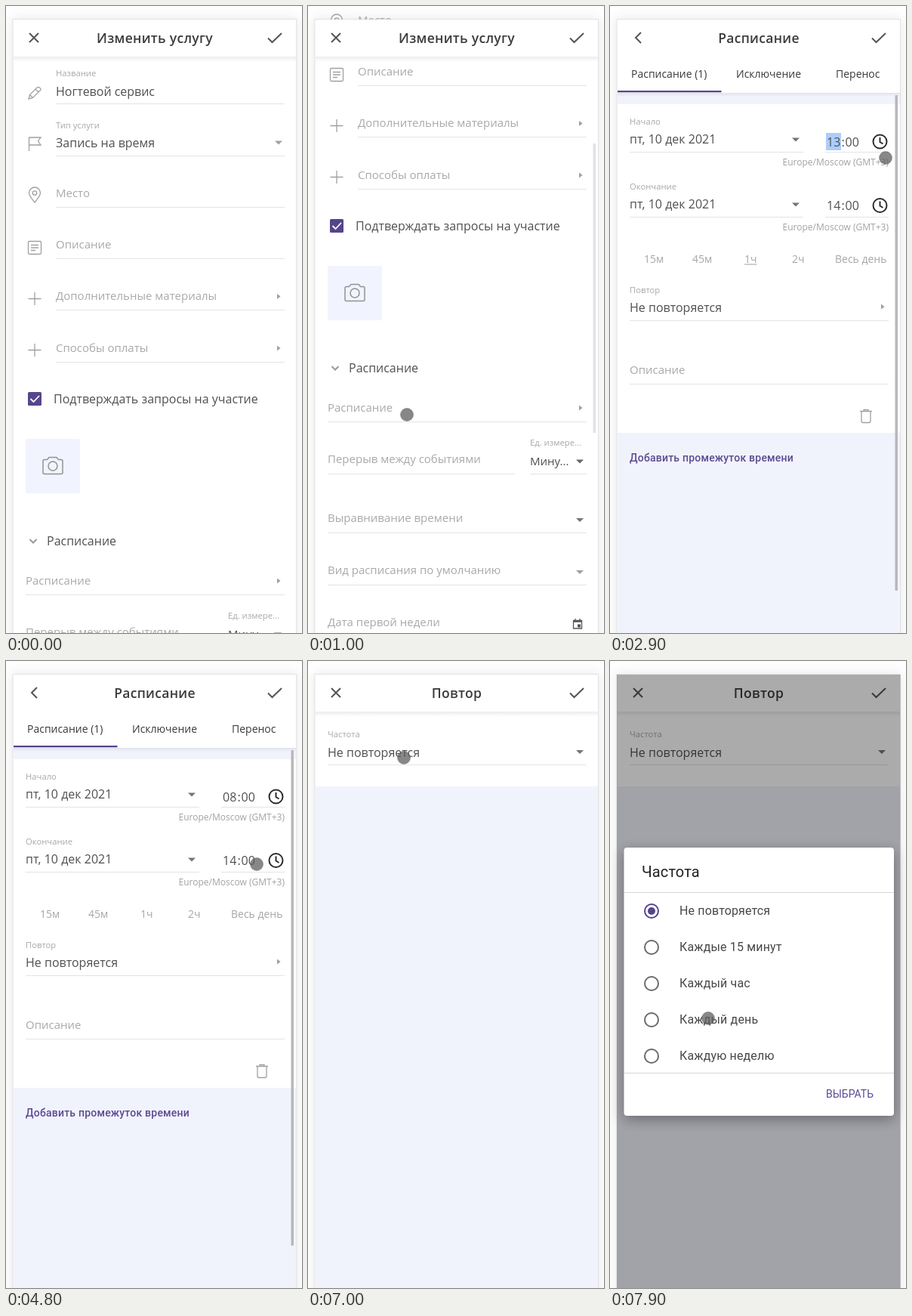
These frames come from a looping animation (392 px wide and 830 px high, 8000 ms). An HTML page:

```html
<!DOCTYPE html>
<html lang="ru">
<head>
<meta charset="utf-8">
<title>Расписание услуги</title>
<style>
  html, body { margin: 0; width: 100%; height: 100%; overflow: hidden; background: #fefefe; }
  svg { display: block; width: 392px; height: 830px; }
  text { font: 16px "Open Sans", sans-serif; fill: #505050; white-space: pre; }
  .title { font-size: 17.5px; font-weight: 600; letter-spacing: .3px; text-anchor: middle; fill: #3c3c3c; }
  .hint { font-size: 15px; fill: #a9a9a9; }
  .label { font-size: 11.25px; fill: #a8a8a8; }
  .zone { font-size: 12px; fill: #a2a2a2; text-anchor: end; }
  .tab { font-size: 14px; fill: #3a3a3a; }
  .span { font-size: 14px; fill: #a6a6a6; }
  .add { font: 500 14px Roboto, sans-serif; letter-spacing: .2px; fill: #5d4b92; }
  .dlg text { font-family: Roboto, sans-serif; letter-spacing: .15px; fill: #484848; }
  .dlg .head { font-size: 20px; fill: #222; }
  .dlg .pick { font-size: 14px; letter-spacing: 0; fill: #5b4a91; }

  .rule { stroke: #e4e4e4; fill: none; }
  .icon { stroke: #a0a0a0; stroke-width: 1.3; fill: none; }
  .nav { stroke: #555; stroke-width: 2; fill: none; }
  .clock { stroke: #2c2c2c; stroke-width: 2; fill: none; }
  .lav { fill: #f1f3fc; }
  .violet { fill: #56458c; }
  .radio { fill: none; stroke: #6b6b6b; stroke-width: 2; }
  .panel { fill: #fff; stroke: #e2e2e2; filter: drop-shadow(0 0 7px rgba(0,0,0,.09)); }

  .anim { animation: 8s step-end infinite; }
  .form { animation-name: form; }
  .scroll { animation-name: scroll; }
  .thumb { animation-name: thumb; }
  .plan { animation-name: plan; }
  .empty { animation-name: empty; }
  .slot { animation-name: slot; }
  .glow { animation-name: glow; }
  .sel { animation-name: sel; }
  .h13 { animation-name: h13; }
  .h00 { animation-name: h00; }
  .h08 { animation-name: h08; }
  .repeat { animation-name: repeat; }
  .dim { animation-name: dim; }
  .cursor { animation-name: cursor; fill: #5a5a5a; fill-opacity: .73; stroke: #666; stroke-opacity: .45; }

  @keyframes form { 0% { opacity: 1 } 16.25%, 100% { opacity: 0 } }
  @keyframes plan { 0% { opacity: 0 } 16.25% { opacity: 1 } 77.5%, 100% { opacity: 0 } }
  @keyframes repeat { 0% { opacity: 0 } 77.5%, 100% { opacity: 1 } }
  @keyframes empty { 0% { opacity: 1 } 22.5%, 100% { opacity: 0 } }
  @keyframes slot { 0% { opacity: 0 } 22.5%, 100% { opacity: 1 } }
  @keyframes sel { 0% { opacity: 0 } 32.5% { opacity: 1 } 52.5%, 100% { opacity: 0 } }
  @keyframes h13 { 0% { opacity: 1 } 42.5%, 100% { opacity: 0 } }
  @keyframes h00 { 0% { opacity: 0 } 42.5% { opacity: 1 } 43.75%, 100% { opacity: 0 } }
  @keyframes h08 { 0% { opacity: 0 } 43.75%, 100% { opacity: 1 } }
  @keyframes glow {
    0% { opacity: 1 }
    23.75% { opacity: 1; animation-timing-function: steps(5) }
    30%, 100% { opacity: 0 }
  }
  @keyframes dim {
    0% { opacity: 0 }
    87.5% { opacity: 0; animation-timing-function: steps(3) }
    91.25%, 100% { opacity: 1 }
  }
  @keyframes scroll {
    0% { transform: none }
    5% { transform: translateY(0); animation-timing-function: steps(4) }
    10%, 100% { transform: translateY(-229px) }
  }
  @keyframes thumb {
    0% { transform: none; opacity: 0 }
    5% { transform: translateY(0); opacity: 1; animation-timing-function: steps(4) }
    10% { transform: translateY(115px); opacity: 1; animation-timing-function: steps(4) }
    15%, 100% { transform: translateY(115px); opacity: 0 }
  }
  @keyframes cursor {
    0% { transform: translate(150px, 860px) }
    2.5% { transform: translate(140px, 812px); animation-timing-function: steps(2) }
    5% { transform: translate(132px, 770px); animation-timing-function: steps(4) }
    10% { transform: translate(131px, 541px) }
    15% { transform: translate(131px, 541px); animation-timing-function: steps(4) }
    20% { transform: translate(87px, 153px) }
    23.75% { transform: translate(87px, 153px); animation-timing-function: steps(5) }
    30% { transform: translate(297px, 183px) }
    32.5% { transform: translate(297px, 183px); animation-timing-function: steps(3) }
    36.25% { transform: translate(365px, 201px) }
    58.75% { transform: translate(354px, 222px) }
    60% { transform: translate(332px, 269px) }
    61.25% { transform: translate(275px, 315px) }
    62.5% { transform: translate(215px, 358px) }
    63.75% { transform: translate(165px, 385px); animation-timing-function: steps(2) }
    66.25% { transform: translate(131px, 399px) }
    78.75% { transform: translate(131px, 399px); animation-timing-function: steps(4) }
    83.75% { transform: translate(127px, 128px) }
    90% { transform: translate(127px, 128px); animation-timing-function: steps(4) }
    95% { transform: translate(133px, 497px); animation-timing-function: steps(3) }
    98.75%, 100% { transform: translate(130px, 473px) }
  }
</style>
</head>
<body>
<svg viewBox="0 0 392 830">
  <defs>
    <linearGradient id="fade" x2="0" y2="1">
      <stop stop-opacity=".07"/><stop offset="1" stop-opacity="0"/>
    </linearGradient>
    <path id="down" d="M-5-2.5H5L0 2.5Z"/>
    <path id="right" d="M-2-3.5V3.5L2.5 0Z" fill="#a0a0a0"/>
    <path id="plus" class="icon" d="M-8.5 0H8.5M0-8.5V8.5"/>
    <path id="cross" class="nav" d="M31 36L43 48M43 36L31 48"/>
    <path id="back" class="nav" d="M41 35L34 42L41 49"/>
    <path id="ok" class="nav" d="M347 42.5L352.5 48L365 36"/>
    <g id="clock" class="clock"><circle r="9"/><path d="M0-5.5V.5L4 3"/></g>
    <g id="bar">
      <rect x="10" y="67" width="374" height="7" fill="url(#fade)"/>
      <rect x="10" y="18" width="374" height="49" fill="#fff"/>
    </g>
    <g id="day">
      <text x="26" y="182">пт, 10 дек 2021</text>
      <use href="#down" x="246" y="177" fill="#757575"/>
      <path class="rule" d="M26 193.5H256M285 193.5H369"/>
      <text class="zone" x="369" y="211">Europe/Moscow (GMT+3)</text>
    </g>
  </defs>

  <rect class="panel" x="9" y="17.5" width="375.5" height="830"/>

  <g class="anim form">
    <g class="anim scroll">
      <path class="rule" d="M66 129.5H369M66 198.5H369M66 266.5H369M66 334.5H369M66 402.5H369M66 471.5H369
        M26 779.5H369M26 848.5H274M294 848.5H369M26 926.5H369M26 995.5H369"/>

      <text class="label" x="66" y="93">Название</text>
      <text x="66" y="119">Ногтевой сервис</text>
      <text class="label" x="66" y="162">Тип услуги</text>
      <text x="66" y="187">Запись на время</text>
      <text class="hint" x="66" y="253">Место</text>
      <text class="hint" x="66" y="321">Описание</text>
      <text class="hint" x="66" y="389">Дополнительные материалы</text>
      <text class="hint" x="66" y="458">Способы оплаты</text>

      <g class="icon">
        <path d="M30 123L31.5 117.5L41 108Q43 106.500 45 108.500T45 112L35.500 121.500ZM39 110L43 114M31.500 117.500L35.500 121.500"/>
        <path d="M30.500 192V174H46L42.500 179L46 184H30.500"/>
        <path d="M38 260Q30.500 251 30.500 247.500A7.500 7.500 0 0 1 45.500 247.500Q45.500 251 38 260Z"/>
        <circle cx="38" cy="247.500" r="2.700"/>
        <rect x="29.500" y="311.500" width="17" height="17" rx="1.500"/>
        <path d="M33 316.500H43M33 320H43M33 323.500H39"/>
      </g>
      <use href="#plus" x="38" y="387.500"/>
      <use href="#plus" x="38" y="455.500"/>
      <use href="#down" x="361" y="181" fill="#a0a0a0"/>
      <use href="#right" x="361" y="384.500"/>
      <use href="#right" x="361" y="453"/>

      <rect class="violet" x="29" y="511" width="18" height="18" rx="1.500"/>
      <path d="M32.500 520L36.500 524L44 516" fill="none" stroke="#fff" stroke-width="1.800"/>
      <text x="63" y="526">Подтверждать запросы на участие</text>

      <rect x="26" y="573" width="72" height="72" rx="2" fill="#f1f4fe"/>
      <g class="icon" style="stroke:#929292;stroke-width:1.500">
        <path d="M51 600.500H54.500L57 597.500H67L69.500 600.500H73Q75 600.500 75 602.500V617.500Q75 619.500 73 619.500H51Q49 619.500 49 617.500V602.500Q49 600.500 51 600.500Z"/>
        <circle cx="62" cy="609" r="6"/>
      </g>

      <path class="nav" style="stroke:#999" d="M31.500 706L36 710.500L40.500 706"/>
      <text x="54" y="714">Расписание</text>
      <text class="hint" x="26" y="766">Расписание</text>
      <use href="#right" x="361" y="761"/>
      <text class="hint" x="26" y="834">Перерыв между событиями</text>
      <text class="label" x="294" y="811">Ед. измере...</text>
      <text x="294" y="837" style="font-size:15px">Мину...</text>
      <use href="#down" x="360" y="832" fill="#666"/>
      <text class="hint" x="26" y="912">Выравнивание времени</text>
      <use href="#down" x="360" y="909.500" fill="#757575"/>
      <text class="hint" x="26" y="981">Вид расписания по умолчанию</text>
      <use href="#down" x="360" y="978.500" fill="#a0a0a0"/>
      <text class="hint" x="26" y="1050">Дата первой недели</text>
      <path class="icon" style="stroke:#555" d="M351.500 1042.500H362.500V1053H351.500ZM351.500 1044H362.500M354 1040V1043M360 1040V1043"/>
      <rect x="357" y="1047.500" width="4" height="4" fill="#555"/>
    </g>
    <rect class="anim thumb" x="377.500" y="67" width="3.500" height="383" fill="#c4c4c8"/>
    <use href="#bar"/><use href="#cross"/><use href="#ok"/>
    <text class="title" x="197" y="49">Изменить услугу</text>
  </g>

  <g class="anim plan">
    <rect x="10" y="18" width="374" height="98" fill="#fff"/>
    <rect class="lav" x="10" y="115" width="374" height="715"/>
    <rect x="10" y="115" width="374" height="5" fill="url(#fade)"/>
    <use href="#back"/><use href="#ok"/>
    <text class="title" x="197" y="49">Расписание</text>
    <text class="tab" x="28" y="95">Расписание<tspan class="anim slot"> </tspan></text>
    <text class="tab" x="167" y="95">Исключение</text>
    <text class="tab" x="299" y="95">Перенос</text>
    <rect class="violet" x="10" y="112" width="137.500" height="2.300"/>

    <text class="anim empty add" x="26" y="152">Добавить промежуток времени</text>

    <g class="anim slot">
      <rect x="24" y="80" width="120" height="22" fill="#fff"/>
      <text class="tab" x="28" y="95">Расписание (1)</text>
      <rect x="10" y="130" width="374" height="435" fill="#fff"/>
      <rect x="377.500" y="118" width="3.500" height="656" rx="1" fill="#b7b8bd"/>

      <text class="label" x="26" y="157">Начало</text>
      <text class="label" x="26" y="243">Окончание</text>
      <use href="#day"/><use href="#day" y="86"/>

      <rect class="anim sel" x="286" y="168" width="20" height="23" fill="#accdfb"/>
      <text class="anim h13" x="287" y="186">13</text>
      <text class="anim h00" x="287" y="186">00</text>
      <text class="anim h08" x="287" y="186">08</text>
      <text x="306.500" y="186">:</text>
      <text x="311.500" y="186">00</text>
      <text x="287" y="270">14</text>
      <text x="306.500" y="270">:</text>
      <text x="311.500" y="270">00</text>
      <use href="#clock" x="357.500" y="179.500"/>
      <use href="#clock" x="357.500" y="264"/>

      <text class="span" x="45" y="340">15м</text>
      <text class="span" x="109" y="340">45м</text>
      <text class="span" x="178" y="340">1ч</text>
      <rect class="anim h13" x="178" y="341.500" width="16.500" height="1" fill="#a0a0a0"/>
      <text class="span" x="241" y="340">2ч</text>
      <text class="span" x="298" y="340">Весь день</text>

      <text class="label" x="26" y="380">Повтор</text>
      <text x="26" y="405">Не повторяется</text>
      <use href="#right" x="361" y="398"/>
      <text class="hint" x="26" y="487">Описание</text>
      <path class="rule" d="M26 416.500H369M26 500.500H369"/>
      <path class="icon" d="M331 536.500H347M336 536V534.500H342V536M333 537V549.500Q333 551.500 335 551.500H343Q345 551.500 345 549.500V537"/>

      <rect class="anim glow" x="10" y="581" width="240.500" height="36.500" rx="2" fill="#e3dfef" style="filter:drop-shadow(0 1px 1px rgba(0,0,0,.08))"/>
      <text class="add" x="26" y="603">Добавить промежуток времени</text>
    </g>
  </g>

  <g class="anim repeat">
    <rect x="10" y="18" width="374" height="148" fill="#fff"/>
    <rect class="lav" x="10" y="166" width="374" height="664"/>
    <use href="#bar"/><use href="#cross"/><use href="#ok"/>
    <text class="title" x="197" y="49">Повтор</text>
    <text class="label" x="26" y="101">Частота</text>
    <text x="26" y="127">Не повторяется</text>
    <use href="#down" x="360" y="120.500" fill="#757575"/>
    <path class="rule" d="M26 137.500H368"/>
  </g>

  <g class="anim dim dlg">
    <rect x="9" y="18" width="375.500" height="812" fill="#000" fill-opacity=".33"/>
    <rect x="18.500" y="247" width="357.500" height="355" rx="4" fill="#fff" style="filter:drop-shadow(0 5px 9px rgba(0,0,0,.35))"/>
    <text class="head" x="42" y="286">Частота</text>
    <path d="M18.500 306.500H376M18.500 545.500H376" stroke="#d6d6d6"/>
    <circle class="radio" cx="55" cy="331" r="9" style="stroke:#56458c"/>
    <circle class="violet" cx="55" cy="331" r="5"/>
    <circle class="radio" cx="55" cy="379" r="9"/>
    <circle class="radio" cx="55" cy="427" r="9"/>
    <circle class="radio" cx="55" cy="475" r="9"/>
    <circle class="radio" cx="55" cy="523" r="9"/>
    <text x="92" y="336">Не повторяется</text>
    <text x="92" y="384">Каждые 15 минут</text>
    <text x="92" y="432">Каждый час</text>
    <text x="92" y="480">Каждый день</text>
    <text x="92" y="528">Каждую неделю</text>
    <text class="pick" x="286" y="578">ВЫБРАТЬ</text>
  </g>

  <circle class="anim cursor" r="8.500"/>
</svg>
</body>
</html>
```
